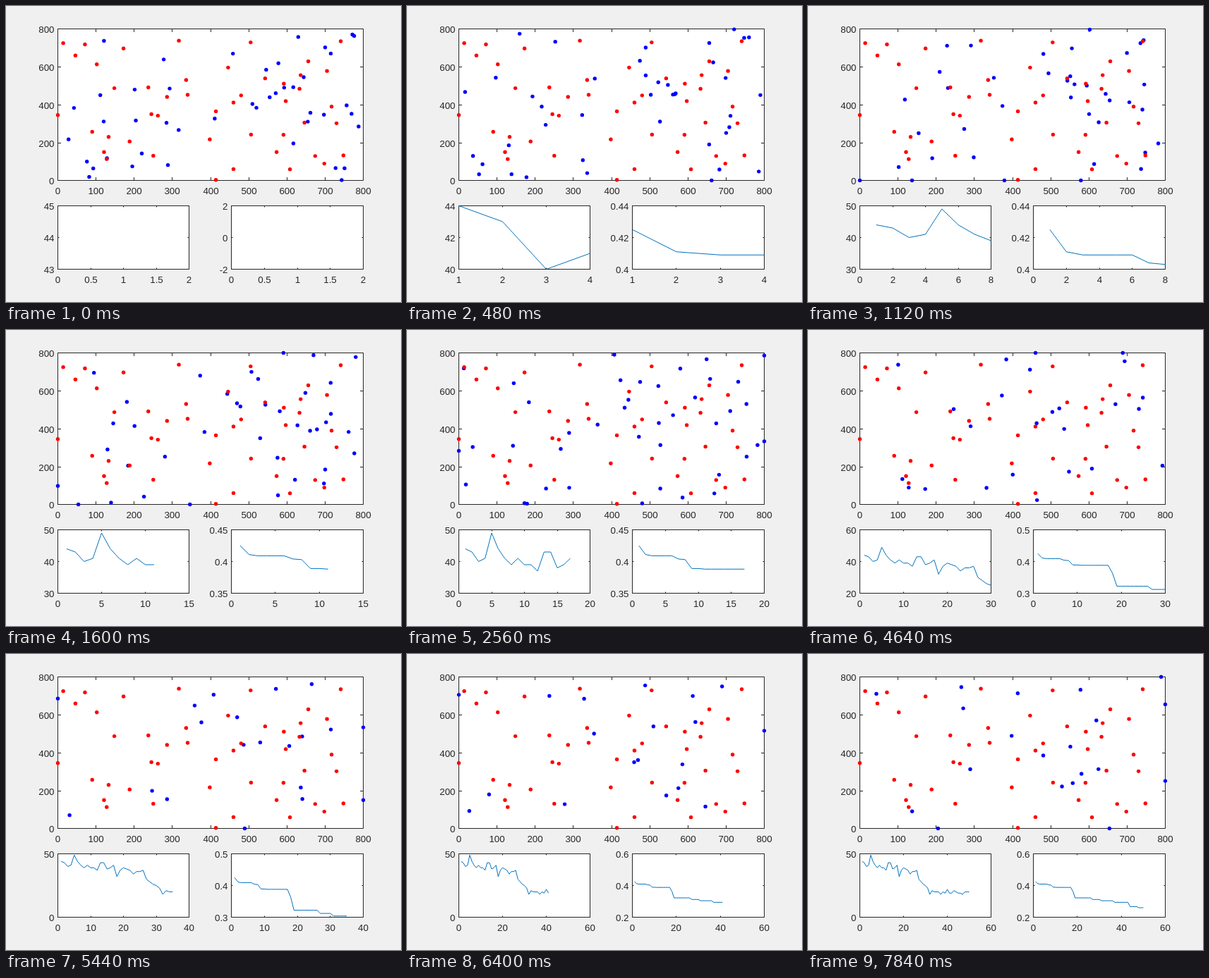
An HTML page with a canvas that plays this animation: 560 px wide and 420 px high, repeating every 8 s.

```html
<!DOCTYPE html>
<html lang="en">
<head>
<meta charset="utf-8">
<title>Particle count</title>
<style>
  html, body { margin: 0; width: 100%; height: 100%; overflow: hidden; background: #f0f0f0; }
  canvas { display: block; }
</style>
</head>
<body>
<canvas id="stage" width="560" height="420"></canvas>
<script>
const ctx = document.getElementById('stage').getContext('2d');
const STEP = 160, STEPS = 50, SIZE = 800, STRIDE = 60;
const PAPER = '#f0f0f0', INK = '#262626', LINE = '#0072bd';

const MAIN = { l: 73.5, t: 32.5, r: 506.5, b: 247.5, tick: 4.5 };
const LEFT = { l: 73.5, t: 283.5, r: 259.5, b: 373.5, tick: 2 };
const RIGHT = { l: 319.5, t: 283.5, r: 506.5, b: 373.5, tick: 2 };

// Resting dots, in axis units.
const resting = [
  [0, 345], [14, 725], [46, 660], [71, 718], [102, 613], [172, 697], [317, 738], [505, 729],
  [741, 735], [446, 596], [656, 629], [705, 578], [636, 556], [543, 539], [336, 530], [340, 452],
  [237, 491], [148, 487], [286, 441], [480, 449], [460, 411], [592, 511], [633, 484], [597, 419],
  [717, 390], [245, 350], [262, 342], [414, 365], [646, 305], [730, 302], [90, 257], [133, 230],
  [188, 206], [398, 217], [506, 242], [591, 241], [121, 150], [128, 113], [250, 130], [573, 150],
  [674, 129], [748, 132], [698, 89], [608, 59], [460, 60], [414, 3]];

// Number of wandering dots at each step.
const counts = [44, 43, 40, 41, 49, 44, 41, 39, 41, 39, 39, 37, 43, 43, 38, 39, 41, 32, 37, 39,
  38, 37, 34, 36, 36, 37, 30, 28, 26, 25, 23, 18, 21, 20, 20, 20, 18, 20, 19, 22,
  19, 19, 21, 20, 19, 19, 18, 20, 20, 20];

// The best value so far: each level holds until the next one starts.
const levels = [[1, .425], [2, .411], [3, .409], [7, .404], [8, .403], [9, .389], [11, .388],
  [18, .363], [19, .322], [27, .312], [31, .304], [37, .294], [44, .267], [48, .26]];
const best = counts.map((_, i) => levels.filter(l => l[0] <= i + 1).pop()[1]);

let seed = 20;
function random() {
  seed = (seed * 1664525 + 1013904223) % 2 ** 32;
  return seed / 2 ** 32;
}

// A random walk that stops at the walls.
const wander = v => Math.min(SIZE, Math.max(0, v + STRIDE * (2 * random() - 1)));
const walk = [Array.from({ length: Math.max(...counts) }, () => [random() * SIZE, random() * SIZE])];
while (walk.length < STEPS) walk.push(walk[walk.length - 1].map(p => p.map(wander)));

// Smallest 1-2-5 step that covers the range with few enough ticks.
function niceScale(min, max, maxTicks) {
  if (min === max) { min -= 1; max += 1; }
  for (let e = -3; ; e++) {
    for (const m of [1, 2, 5]) {
      const step = m * 10 ** e;
      const lo = Math.floor(min / step + 1e-9), hi = Math.ceil(max / step - 1e-9);
      if (hi - lo < maxTicks) return { lo: lo * step, hi: hi * step, step };
    }
  }
}

function ticks({ lo, hi, step }) {
  const n = Math.round((hi - lo) / step);
  return Array.from({ length: n + 1 }, (_, i) => lo + i * step);
}

const mapX = (box, s, v) => box.l + (v - s.lo) / (s.hi - s.lo) * (box.r - box.l);
const mapY = (box, s, v) => box.b - (v - s.lo) / (s.hi - s.lo) * (box.b - box.t);
const crisp = v => Math.floor(v) + .5;
const label = v => String(+v.toFixed(4));

function axes(box, sx, sy) {
  const w = box.r - box.l, h = box.b - box.t;
  ctx.fillStyle = '#fff';
  ctx.fillRect(box.l, box.t, w, h);
  ctx.strokeStyle = ctx.fillStyle = INK;
  ctx.lineWidth = 1;
  ctx.font = '13.33px "Liberation Sans", Arial, sans-serif';
  ctx.beginPath();
  ctx.rect(box.l, box.t, w, h);
  ctx.textAlign = 'center';
  for (const v of ticks(sx)) {
    const x = crisp(mapX(box, sx, v));
    ctx.moveTo(x, box.b); ctx.lineTo(x, box.b - box.tick);
    ctx.moveTo(x, box.t); ctx.lineTo(x, box.t + box.tick);
    ctx.fillText(label(v), x, box.b + 19.5);
  }
  ctx.textAlign = 'right';
  for (const v of ticks(sy)) {
    const y = crisp(mapY(box, sy, v) + .3);
    ctx.moveTo(box.l, y); ctx.lineTo(box.l + box.tick, y);
    ctx.moveTo(box.r, y); ctx.lineTo(box.r - box.tick, y);
    ctx.fillText(label(v), box.l - 5, y + 5);
  }
  ctx.stroke();
}

function chart(box, data) {
  const sx = niceScale(1, data.length, 5);
  const sy = niceScale(Math.min(...data), Math.max(...data), 3);
  axes(box, sx, sy);
  if (data.length < 2) return;
  ctx.strokeStyle = LINE;
  ctx.lineJoin = 'round';
  ctx.beginPath();
  data.forEach((v, i) => ctx.lineTo(mapX(box, sx, i + 1), mapY(box, sy, v)));
  ctx.stroke();
}

const fieldX = { lo: 0, hi: SIZE, step: 100 };
const fieldY = { lo: 0, hi: SIZE, step: 200 };

function dots(points, color) {
  ctx.fillStyle = color;
  for (const [x, y] of points) {
    ctx.beginPath();
    ctx.arc(mapX(MAIN, fieldX, x), mapY(MAIN, fieldY, y), 2.7, 0, 2 * Math.PI);
    ctx.fill();
  }
}

function draw(k) {
  ctx.fillStyle = PAPER;
  ctx.fillRect(0, 0, 560, 420);
  axes(MAIN, fieldX, fieldY);
  dots(walk[k].slice(0, counts[k]), '#00f');
  dots(resting, '#f00');
  chart(LEFT, counts.slice(0, k + 1));
  chart(RIGHT, best.slice(0, k + 1));
}

const begin = performance.now();
function tick() {
  draw(Math.floor(Math.max(0, performance.now() - begin) / STEP) % STEPS);
  requestAnimationFrame(tick);
}
tick();
</script>
</body>
</html>
```
